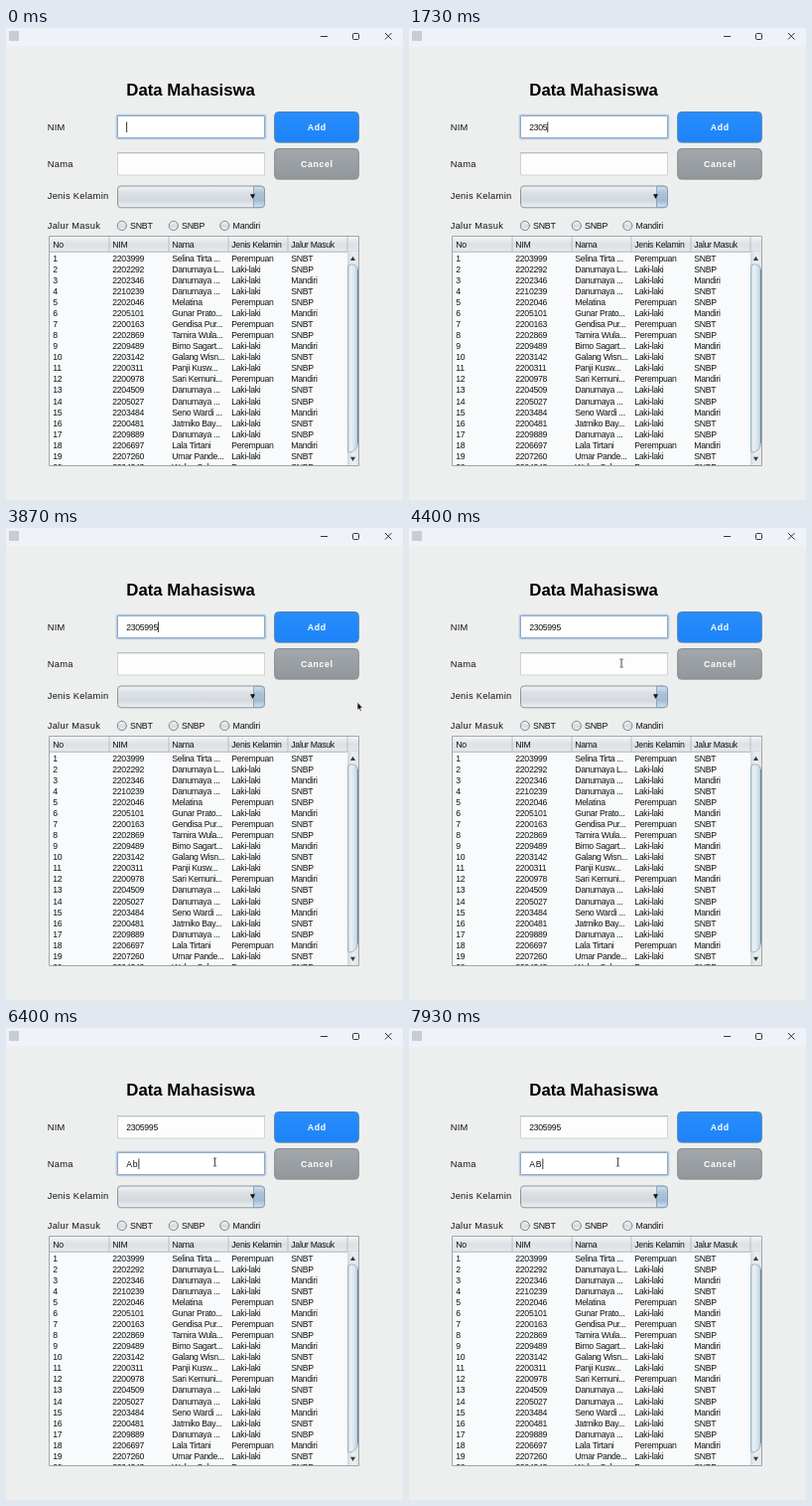
These frames come from a looping animation (400x475 px, 8 s). An HTML page with a canvas:

```html
<!DOCTYPE html>
<html lang="id">
<head>
<meta charset="utf-8">
<title>Data Mahasiswa</title>
<style>
html, body { margin: 0; width: 100%; height: 100%; overflow: hidden; background: #edefee; }
canvas { display: block; width: 400px; height: 475px; }
</style>
</head>
<body>
<canvas id="stage"></canvas>
<script>
const LOOP = 8000, W = 400, H = 475;
const canvas = document.getElementById('stage');
const ctx = canvas.getContext('2d');
const ratio = window.devicePixelRatio || 1;
canvas.width = W * ratio;
canvas.height = H * ratio;

const FAMILY = '"Liberation Sans", Arial, sans-serif';
const SMALL = 8.7, TIGHT = -0.3;
const COLUMNS = [47.3, 107.3, 167.3, 227.3, 287.3];
const HEADERS = ['No', 'NIM', 'Nama', 'Jenis Kelamin', 'Jalur Masuk'];
const GENDER = { P: 'Perempuan', L: 'Laki-laki' };
const PATHS = { T: 'SNBT', P: 'SNBP', M: 'Mandiri' };
const STUDENTS = `2203999|Selina Tirta ...|PT
2202292|Danumaya L...|LP
2202346|Danumaya ...|LM
2210239|Danumaya ...|LT
2202046|Melatina|PP
2205101|Gunar Prato...|LM
2200163|Gendisa Pur...|PT
2202869|Tamira Wula...|PP
2209489|Bimo Sagart...|LM
2203142|Galang Wisn...|LT
2200311|Panji Kusw...|LP
2200978|Sari Kemuni...|PM
2204509|Danumaya ...|LT
2205027|Danumaya ...|LP
2203484|Seno Wardi ...|LM
2200481|Jatmiko Bay...|LT
2209889|Danumaya ...|LP
2206697|Lala Tirtani|PM
2207260|Umar Pande...|LT
2204343|Wulan Seka...|PP`.split('\n').map(line => line.split('|'));

// Each edit: time, text after it
const NIM_EDITS = [[0, ''], [270, '2'], [400, '23'], [1530, '230'], [1730, '2305'],
  [2330, '23059'], [3070, '230599'], [3500, '2305995']];
const NAME_EDITS = [[4700, ''], [5870, 'A'], [6200, 'Ab'], [7200, 'A'], [7600, 'AB']];
const FOCUS_SWITCH = 4700;
const POINTER = [[3600, 402, 212], [3870, 354.5, 175.5], [4500, 210.5, 135]];

function gradient(x0, y0, x1, y1, ...colors) {
  const g = ctx.createLinearGradient(x0, y0, x1, y1);
  colors.forEach((c, i) => g.addColorStop(i / (colors.length - 1), c));
  return g;
}

function box(x, y, w, h, r, fill, stroke, line = 1) {
  ctx.beginPath();
  ctx.roundRect(x, y, w, h, r);
  if (fill) { ctx.fillStyle = fill; ctx.fill(); }
  if (stroke) { ctx.strokeStyle = stroke; ctx.lineWidth = line; ctx.stroke(); }
}

function text(str, x, y, size, { color = '#111', weight = '', spacing = 0, align = 'left' } = {}) {
  ctx.font = `${weight} ${size}px ${FAMILY}`;
  ctx.letterSpacing = spacing + 'px';
  ctx.textAlign = align;
  ctx.fillStyle = color;
  ctx.fillText(str, x, y);
  return ctx.measureText(str).width;
}

function polygon(points, fill, stroke) {
  ctx.beginPath();
  points.forEach(([x, y]) => ctx.lineTo(x, y));
  ctx.closePath();
  if (fill) { ctx.fillStyle = fill; ctx.fill(); }
  if (stroke) { ctx.strokeStyle = stroke; ctx.lineWidth = 0.6; ctx.stroke(); }
}

function line(points, color, width = 1) {
  ctx.beginPath();
  points.forEach(([x, y]) => ctx.lineTo(x, y));
  ctx.strokeStyle = color;
  ctx.lineWidth = width;
  ctx.stroke();
}

function drawWindow() {
  ctx.fillStyle = '#edefee';
  ctx.fillRect(0, 0, W, H);
  ctx.fillStyle = '#eff3f9';
  ctx.fillRect(0, 0, W, 18.5);
  box(3, 3, 10, 10, 0, '#c9ccd0');
  line([[317, 8.5], [324, 8.5]], '#333');
  box(349.5, 5.5, 6, 6, 1, null, '#333');
  line([[382, 5], [388.5, 11.5]], '#333');
  line([[388.5, 5], [382, 11.5]], '#333');
}

function drawButton(y, label, top, bottom, border) {
  box(270.5, y + 1, 85, 31, 4, 'rgba(90,100,110,.25)');
  box(270.7, y + 0.5, 84.6, 30.5, 4, gradient(0, y, 0, y + 31, top, bottom), border);
  text(label, 313.3, y + 18.5, 8.8, { color: '#fff', weight: 'bold', spacing: 0.65, align: 'center' });
}

function drawCombo() {
  box(112.5, 159, 148, 21.8, 3.5, gradient(0, 158, 0, 181, '#f4f6f7', '#dce1e5', '#d3d9de', '#eef2f5'), '#8b949d');
  box(249.5, 159.3, 11, 21.2, [0, 3.5, 3.5, 0],
    gradient(0, 158, 0, 181, '#dfe9f1', '#abc3d8', '#a0bcd4', '#d3e4f1'), '#7f98ae', 0.8);
  polygon([[246, 167.2], [251, 167.2], [248.5, 172]], '#111');
}

function drawRadio(x, label) {
  ctx.beginPath();
  ctx.arc(x, 199, 4.6, 0, Math.PI * 2);
  ctx.fillStyle = gradient(0, 194, 0, 204, '#fbfcfc', '#d5dadf', '#f0f3f5');
  ctx.fill();
  ctx.strokeStyle = '#747c85';
  ctx.lineWidth = 0.9;
  ctx.stroke();
  text(label, x + 8.2, 202, 8.8, { spacing: -0.2 });
}

function drawScrollbar() {
  box(344, 225, 11, 215, 0, gradient(344, 0, 355, 0, '#d3d8dc', '#eceff1', '#e2e6e9'));
  box(344.5, 238, 10, 189, [3, 5, 9, 1],
    gradient(344, 0, 355, 0, '#c9d7e3', '#eaf1f7', '#d6e2ec', '#b3c8d9'), '#8fa6ba', 0.8);
  line([[354.4, 243], [354.4, 418]], '#5f7b94', 0.9);
  polygon([[347, 234], [352, 234], [349.5, 229.8]], '#333a42');
  polygon([[347, 431.8], [352, 431.8], [349.5, 436]], '#333a42');
}

function drawTable() {
  box(43.5, 209.5, 312, 231, 0, '#f8fafb', '#a0a7ae');
  box(44, 210, 311, 15, 0, gradient(0, 210, 0, 225, '#f3f5f6', '#dde1e5', '#e5e9ec'));
  line([[44, 225.3], [355, 225.3]], '#a7afb7', 0.9);
  for (let x = 104; x <= 344; x += 60) line([[x, 210], [x, 225]], '#b3bac1', 0.9);
  HEADERS.forEach((h, i) => text(h, COLUMNS[i], 221, SMALL, { spacing: TIGHT }));
  ctx.save();
  ctx.beginPath();
  ctx.rect(44, 225, 300, 215);
  ctx.clip();
  STUDENTS.forEach(([nim, name, codes], row) => {
    const cells = [String(row + 1), nim, name, GENDER[codes[0]], PATHS[codes[1]]];
    cells.forEach((cell, i) => text(cell, COLUMNS[i], 235 + row * 11.04, SMALL, { spacing: TIGHT }));
  });
  ctx.restore();
  drawScrollbar();
}

function drawField(y, edits, t, focused, spacing) {
  if (focused) {
    box(111.5, y - 0.5, 150, 24, 1.5, '#fff', '#b3c8dd', 1.6);
    box(112.5, y + 0.5, 148, 22, 0.5, '#fff', '#8fabc8', 1);
  } else {
    box(112.5, y + 0.5, 148, 22.5, 0, '#fdfdfd', '#d0d3d5');
    line([[112, y + 0.5], [261, y + 0.5]], '#bbbfc2');
    line([[113, y + 1.5], [260, y + 1.5]], '#e6e8e9');
  }
  const edit = edits.filter(([time]) => time <= t).pop();
  if (!edit) return;
  const [time, value] = edit;
  const width = text(value, 121.2, y + 15, SMALL, { spacing });
  if (focused && Math.floor((t - time) / 500) % 2 === 0) {
    ctx.fillStyle = '#222';
    ctx.fillRect(121.2 + width, y + 6.5, 0.9, 10.5);
  }
}

function drawPointer(t) {
  if (t < POINTER[0][0]) return;
  let [, x, y] = POINTER[POINTER.length - 1];
  for (let i = 1; i < POINTER.length; i++) {
    const [t0, x0, y0] = POINTER[i - 1], [t1, x1, y1] = POINTER[i];
    if (t < t0 || t >= t1) continue;
    const p = (t - t0) / (t1 - t0), eased = 1 - (1 - p) ** 2;
    x = x0 + (x1 - x0) * eased;
    y = y0 + (y1 - y0) * eased;
  }
  if (x > 112 && x < 261 && y > 125 && y < 148) {
    line([[x, y - 4], [x, y + 4]], '#333', 0.9);
    for (const dy of [-4, 4]) line([[x - 1.8, y + dy], [x + 1.8, y + dy]], '#555', 0.8);
  } else {
    const shape = [[0, 0], [0, 8], [1.8, 6.4], [3, 9.2], [4.2, 8.7], [3, 5.9], [5.4, 5.7]];
    polygon(shape.map(([dx, dy]) => [x + dx, y + dy]), '#111', '#fff');
  }
}

function draw(t) {
  ctx.setTransform(ratio, 0, 0, ratio, 0, 0);
  drawWindow();
  text('Data Mahasiswa', 121.3, 68.3, 16.8, { weight: 'bold', color: '#000' });
  const labels = [['NIM', 103], ['Nama', 140], ['Jenis Kelamin', 172.3], ['Jalur Masuk', 201.7]];
  labels.forEach(([label, y]) => text(label, 41.7, y, 9.3, { spacing: 0.3 }));
  drawField(88, NIM_EDITS, t, t < FOCUS_SWITCH, TIGHT);
  drawField(125, NAME_EDITS, t, t >= FOCUS_SWITCH, 0.8);
  drawButton(84, 'Add', '#2a8efb', '#1b83fa', '#4a80b8');
  drawButton(121, 'Cancel', '#a3a8ac', '#92979b', '#868c92');
  drawCombo();
  drawRadio(116.8, 'SNBT');
  drawRadio(168.8, 'SNBP');
  drawRadio(220.3, 'Mandiri');
  drawTable();
  drawPointer(t);
}

const start = performance.now();
function tick() {
  draw((performance.now() - start) % LOOP);
  requestAnimationFrame(tick);
}
tick();
</script>
</body>
</html>
```
